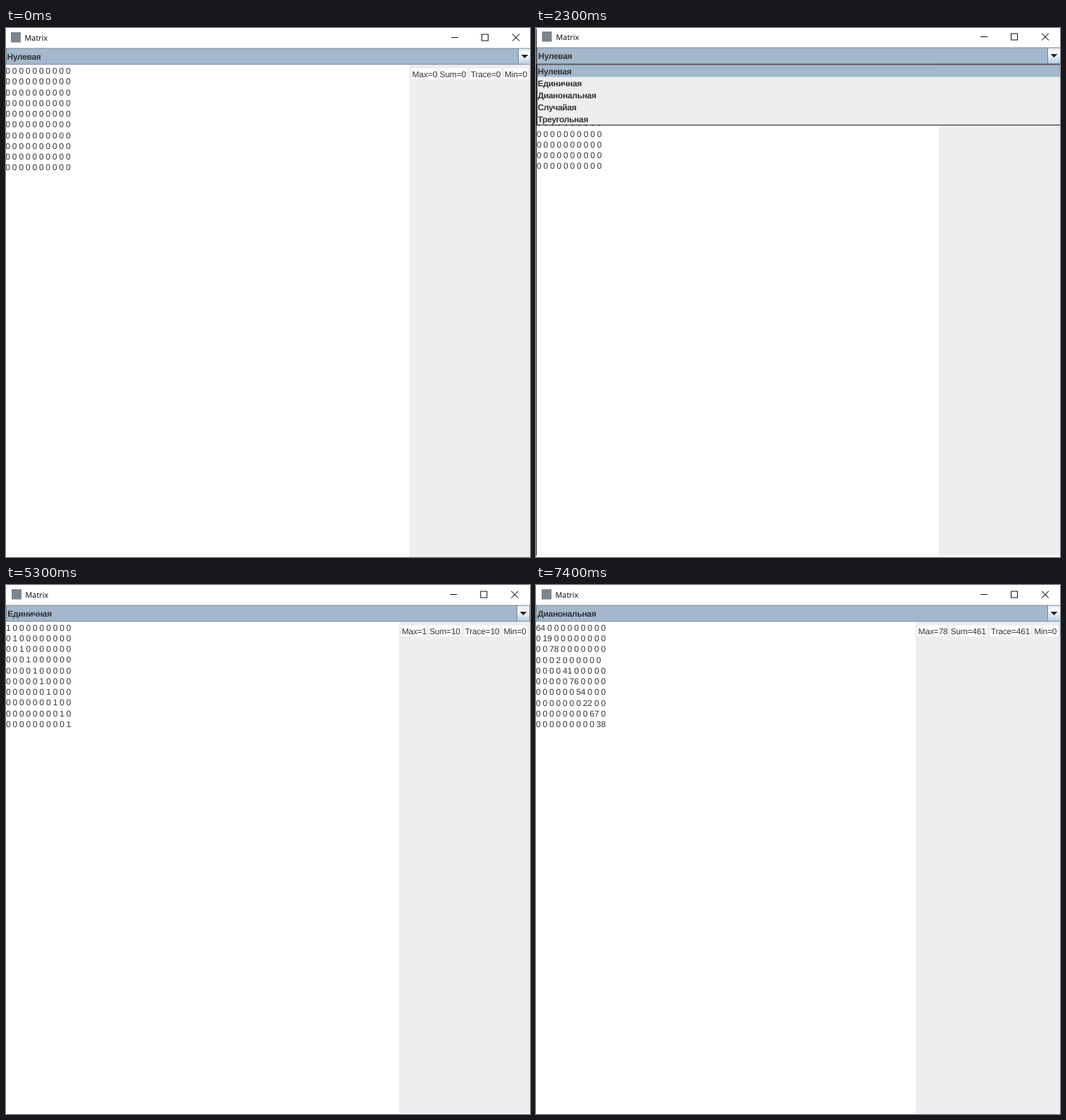
Animation, 745 px wide and 752 px high, one loop 8000 ms. Source, as an HTML page:

```html
<!DOCTYPE html>
<html lang="ru">
<head>
<meta charset="utf-8">
<title>Matrix</title>
<style>
  html, body { margin: 0; width: 100%; height: 100%; overflow: hidden; background: #fff; }
  svg { display: block; width: 100%; height: 100%; }
  text {
    font: 12px "Liberation Sans", Arial, sans-serif;
    fill: #333;
    text-rendering: geometricPrecision;
  }
  .cells { word-spacing: -.47px; }
  .stat { letter-spacing: -.2px; }
  .bold { font-weight: bold; letter-spacing: -.33px; }
  .title { font: 10.9px "Open Sans", "Noto Sans", sans-serif; fill: #000; }
  .icon { fill: none; stroke: #111; stroke-width: 1.05; }
</style>
</head>
<body>
<svg id="stage" viewBox="0 0 745 752">
  <defs>
    <linearGradient id="button" x1="0" y1="0" x2="0" y2="1">
      <stop offset="0" stop-color="#dde8f3"/>
      <stop offset=".3" stop-color="#fff"/>
      <stop offset="1" stop-color="#b8cfe5"/>
    </linearGradient>
  </defs>
  <g id="view"></g>
</svg>
<script>
const view = document.getElementById('view');
const LOOP = 8000, SIZE = 10, ROW = 15.25;
const KINDS = ['Нулевая', 'Единичная', 'Дианональная', 'Случайая', 'Треугольная'];

// Each state: window layout and the values on the matrix diagonal.
const states = [
  { from: 0, kind: 0, diag: Array(SIZE).fill(0), y: 0, logo: 7, title: 26.5, label: 1.6,
    x: -0.7, base: 65.2, ctrl: 638, btn: 728, panel: 573.5, bottom: 752,
    stats: [577.5, 616.6, 660.8, 708.9], end: 742 },
  { from: 500, kind: 0, diag: Array(SIZE).fill(0), y: -1, logo: 8.5, title: 28.5, label: 3.3,
    x: 0.9, base: 63.2, ctrl: 637, btn: 727, panel: 573, bottom: 750, open: true },
  { from: 3500, kind: 1, diag: Array(SIZE).fill(1), y: 0, logo: 8, title: 27.5, label: 2.3,
    x: -0.1, base: 64.7, ctrl: 636.3, btn: 726, panel: 558.8, bottom: 751,
    stats: [562.7, 602, 652.6, 707.5], end: 741 },
  { from: 6500, kind: 2, diag: [64, 19, 78, 2, 41, 76, 54, 22, 67, 38], y: 0, logo: 8,
    title: 27.5, label: 2.3, x: -0.1, base: 64.9, ctrl: 637, btn: 727, panel: 539.6, bottom: 752,
    stats: [543.5, 589.4, 646.8, 708.3], end: 742 }
];

const rect = (x, y, w, h, fill) =>
  `<rect x="${x}" y="${y}" width="${w}" height="${h}" fill="${fill}"/>`;
const text = (x, y, str, cls) => `<text x="${x}" y="${y}" class="${cls}">${str}</text>`;

function titleBar(s) {
  const x = s.ctrl, y = 13.5 + s.y;
  return rect(s.logo, 6 + s.y, 14, 14.5, '#7b8590') +
    text(s.title, 17.8 + s.y, 'Matrix', 'title') +
    `<path class="icon" d="M${x - 5} ${y}h10M${x + 38.5} ${y - 4.5}h9v9h-9z
      M${x + 82} ${y - 5}l10 10m0-10l-10 10"/>`;
}

function combo(s) {
  const top = 28.5 + s.y, mid = s.btn + 9.5, left = s.open ? 1 : 0;
  return rect(left, top, s.btn + 19 - left, 23.7, '#7a8a99') +
    rect(left + 1, top + 1, s.btn - left - 1, 21.7, '#a3b8cc') +
    rect(s.btn + 1, top + 1, 17, 21.7, 'url(#button)') +
    `<path d="M${mid - 5} ${top + 9.5}h10l-5 5z" fill="#222"/>` +
    text(s.label, 45.1 + s.y, KINDS[s.kind], 'bold');
}

function matrix(s) {
  return s.diag.map((d, i) => {
    const row = Array(SIZE).fill(0);
    row[i] = d;
    return text(s.x, s.base + i * ROW, row.join(' '), 'cells');
  }).join('');
}

function summary(s) {
  const sum = s.diag.reduce((a, b) => a + b, 0);
  const labels = ['Max=' + Math.max(...s.diag), 'Sum=' + sum, 'Trace=' + sum, 'Min=0'];
  return labels.map((label, i) => {
    const x = s.stats[i] - 0.6;
    const end = i < 3 ? s.stats[i + 1] - 5.2 : s.end;
    return rect(x, 57.5, end - x, 15.3, '#fff') + text(s.stats[i], 69.7, label, 'stat');
  }).join('');
}

function popup() {
  return rect(0.5, 51.3, 744.5, 87.2, '#222') +
    rect(2, 52.6, 743, 84.8, '#eee') +
    rect(2, 52.8, 743, 16.7, '#a3b8cc') +
    KINDS.map((k, i) => text(2.5, 65.7 + i * 17.15, k, 'bold')).join('');
}

function render(s) {
  view.innerHTML = rect(0, 0, 745, 752, '#fff') + titleBar(s) +
    rect(s.panel, 52.4 + s.y, 745 - s.panel, s.bottom - 52.4 - s.y, '#eee') +
    matrix(s) + combo(s) + (s.open
      ? popup() + rect(0, 1, 1, 749, '#333')
      : summary(s));
}

let shown;
function tick(now) {
  const t = now % LOOP;
  const s = states.filter(v => v.from <= t).pop();
  if (s !== shown) render(shown = s);
  requestAnimationFrame(tick);
}
tick(performance.now());
</script>
</body>
</html>
```
